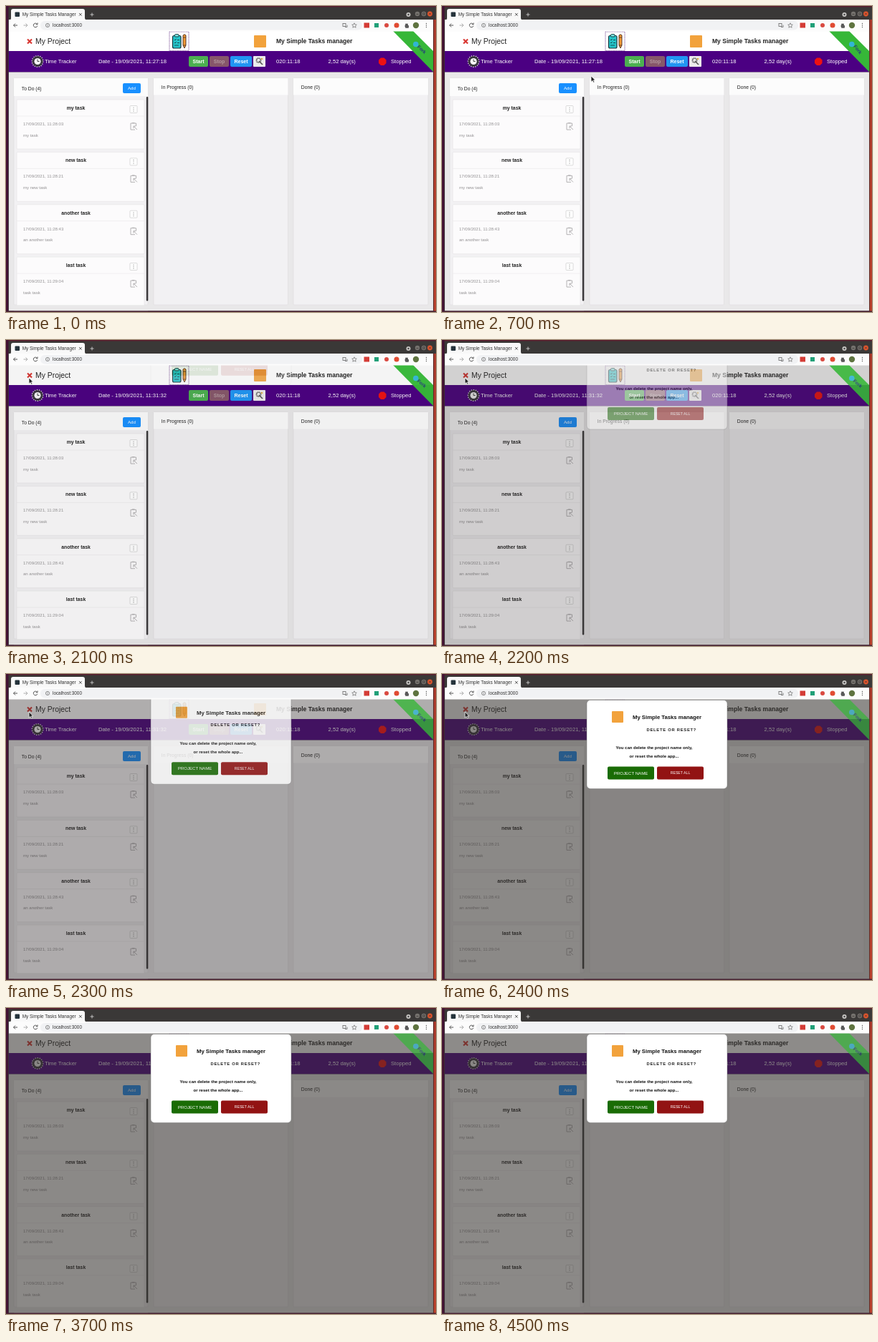
Write an HTML page that moves like this. It is 600 px wide and 428 px high and loops after 4700 ms.

```html
<!DOCTYPE html>
<html lang="en">
<head>
<meta charset="utf-8">
<title>Tasks</title>
<style>
html, body { margin: 0; width: 100%; height: 100%; overflow: hidden; background: #2b2029; }
svg { display: block; width: 100vw; height: 100vh; }
text { font-family: "Liberation Sans", Arial, sans-serif; white-space: pre; }
</style>
</head>
<body>
<svg id="stage" viewBox="0 0 600 428" preserveAspectRatio="none"></svg>
<script>
const LOOP = 4700, STEP = 100;

const text = (x, y, s, size, fill = '#222', more = '') =>
  `<text x="${x}" y="${y}" font-size="${size}" fill="${fill}" ${more}>${s}</text>`;
const rect = (x, y, w, h, fill, r = 0, more = '') =>
  `<rect x="${x}" y="${y}" width="${w}" height="${h}" fill="${fill}" rx="${r}" ${more}/>`;
const circle = (x, y, r, fill, more = '') =>
  `<circle cx="${x}" cy="${y}" r="${r}" fill="${fill}" ${more}/>`;
const line = (d, color, w = 1, more = '') =>
  `<path d="${d}" fill="none" stroke="${color}" stroke-width="${w}" ${more}/>`;
const BOLD = 'font-weight="bold"', MID = 'text-anchor="middle"', BM = BOLD + ' ' + MID;

const button = (x, y, w, h, fill, label, size, color = '#fff', more = MID) =>
  rect(x, y, w, h, fill, 2) + text(x + w / 2, y + h / 2 + size * .36, label, size, color, more);

function card(y, title, time, body) {
  const dots = [-2.4, 0, 2.4].map(d => circle(178, y + 13.5 + d, .6, '#888')).join('');
  return rect(15, y, 178, 69, '#fcfbfc', 1, 'stroke="#e4e2e4" stroke-width=".6"') +
    line(`M15 ${y + 23}H193`, '#ebe9eb', .7) +
    text(97.5, y + 14, title, 6.85, '#222', BM) +
    rect(173, y + 8.5, 10, 10, '#fff', 1, 'stroke="#ccc" stroke-width=".7"') + dots +
    text(24, y + 36, time, 6, '#929092') + text(24, y + 51.5, body, 6, '#929092') +
    line(`M180 ${y + 42}H174V${y + 33}H181.500V${y + 37}M176 ${y + 32.500}H179.500M178 ${y + 37}L183 ${y + 42}M178 ${y + 40}V${y + 37}H181`, '#b3b1b3', 1);
}

const column = (x, w, title, head) =>
  rect(x, 101, w, 317, '#f2f1f3', 1, 'stroke="#dddbdd" stroke-width=".6"') +
  rect(x, 101, w, head, '#fcfcfc') + text(x + 10.8, head > 24 ? 117.5 : 116, title, 6.75);

const clipboard =
  rect(228, 36, 27, 26.5, '#fff', 0, 'stroke="#70408f" stroke-width=".8" stroke-dasharray="1.5 .8"') +
  rect(232.500, 41.500, 11.5, 17.5, '#25c4c9', 2, 'stroke="#17343c" stroke-width="1.2"') +
  rect(235.500, 39.500, 5.500, 3.500, '#7be3df', 1, 'stroke="#17343c" stroke-width=".9"') +
  line('M235 47l1 1 1.500-2M239 47.500h3M235 51l1 1 1.500-2M239 51.500h3M235 55h6', '#14424b', .9) +
  `<path d="M247 41q2-2.500 4 0V55l-2 4-2-4Z" fill="#f39a35" stroke="#4a2b21" stroke-width=".9"/>` +
  line('M247 44h4M247 55h4', '#4a2b21', .8);

const header =
  rect(3, 35, 593, 28, '#fff') +
  line('M30 46.500l6 6m0-6l-6 6', '#d8342f', 2.1) +
  text(41, 52.8, 'My Project', 10.4) + clipboard +
  rect(346, 41, 17, 17, '#f2a23c', 1) +
  text(377, 52.3, 'My Simple Tasks manager', 8.56, '#222', BOLD);

const gear = circle(352.500, 76, 3, 'none', 'stroke="#555" stroke-width="1.7" stroke-dasharray="1.400 .6"') +
  line('M353 77l5 5', '#555', 1.6) + circle(357, 74, 1.3, '#e0b04b');

const tracker =
  rect(3, 63, 593, 29.500, '#4b0082') +
  circle(44, 77.500, 7.8, '#38343d', 'id="ring" stroke="#e8e2ec" stroke-width="1.3" stroke-dasharray="1.300 1.760"') +
  circle(44, 77.500, 4.6, '#f7f7f7') + line('M44 74.500v3h2.500', '#333', .9) +
  text(54, 80.2, 'Time Tracker', 7.68, '#fff') +
  text(129, 80.2, '', 7.68, '#fff', 'id="date"') +
  button(255, 70, 27, 15, '#4caf50', 'Start', 7, '#fff', BM) +
  button(284, 70, 27, 15, '#87576a', 'Stop', 7, '#b39a9f', BM) +
  button(313, 70, 30, 15, '#2196f3', 'Reset', 7, '#fff', BM) +
  rect(345, 70, 17, 15, '#ececec', 1) + gear +
  text(377, 80.2, '020:11:18', 7.68, '#fff') +
  text(449.500, 80.2, '2,52 day(s)', 7.68, '#fff') +
  `<path d="M523 72.500h4.500l3 3v4.500l-3 3H523l-3-3v-4.500Z" fill="#ee1111"/>` +
  text(537, 80.2, 'Stopped', 7.68, '#fff');

const tasks = [
  ['my task', '03', 'my task'], ['new task', '21', 'my new task'],
  ['another task', '43', 'an another task'], ['last task', '04', 'task task']
];
const board =
  rect(3, 92.500, 593, 334, '#e9e8e9') +
  column(11, 187, 'To Do (4)', 25) + column(206, 187.500, 'In Progress (0)', 23.500) +
  column(401, 188, 'Done (0)', 23.500) +
  button(163, 108, 25, 14, '#1890ff', 'Add', 6.2) +
  tasks.map(([title, sec, body], i) =>
    card(131 + i * 73.35, title, `17/09/2021, 11:${i < 3 ? 28 : 29}:${sec}`, body)).join('') +
  rect(11, 418.3, 187, 8, '#e9e8e9') +
  rect(195.800, 127, 2.500, 285.500, '#3a383a', 1);

const ribbon = `<g id="ribbon"><path d="M540 35H568L596 63V92Z" fill="#36b738"/>` +
  circle(571.800, 53.500, 3.8, '#31b5d6') +
  `<g id="tag">${text(0, 2, 'Fork', 6.5, '#25387f', BM)}</g></g>`;

const modal = `<g id="modal">` +
  rect(202, 36.500, 196, 124, '#fff', 5, 'stroke="#777" stroke-width=".5"') +
  rect(237, 52, 16, 16, '#f2a23c', 1) +
  text(266, 63, 'My Simple Tasks manager', 7.72, '#111', BOLD) +
  text(285.500, 79.700, 'DELETE OR RESET?', 5.8, '#222', BOLD + ' letter-spacing=".75"') +
  text(296, 105.2, 'You can delete the project name only,', 6.02, '#111', BM) +
  text(296, 117.2, 'or reset the whole app...', 6.02, '#111', BM) +
  button(231, 129.500, 65, 18, '#1a6c05', 'PROJECT NAME', 6.1) +
  button(300, 129.500, 65, 18, '#921313', 'RESET ALL', 5.2) + `</g>`;

const chrome =
  rect(0, 0, 600, 35, '#3a3837') + rect(0, 0, 600, 1.5, '#5a1c2c') +
  `<path d="M5 19.500q2 0 2-3V7q0-3 3-3H107q3 0 3 3v9.500q0 3 3 3Z" fill="#f8f8f8"/>` +
  rect(12.500, 8.500, 6.500, 6.500, '#25333b', 1) +
  text(22.800, 14.2, 'My Simple Tasks Manager', 6.4, '#333') +
  line('M102 10l3.600 3.600m0-3.600l-3.600 3.600', '#444', .9) +
  line('M117.500 12h5M120 9.500v5', '#ccc', .9) +
  circle(561.500, 12, 3, '#c9c7c5') + circle(561.500, 12, 1.2, '#444') +
  [574, 583].map(x => circle(x, 11, 3.2, '#75726e')).join('') + circle(591.500, 11, 3.4, '#e3562d') +
  line('M572.500 11.500h3M581.700 9.700h2.600v2.600h-2.600ZM590 9.500l3 3m0-3l-3 3', '#35322f', .7) +
  rect(3, 19, 593, 16.500, '#fcfcfc') + rect(48, 21, 449, 12.500, '#f1f2f4', 6) +
  line('M16 27H10.500m2.500-2.500L10.500 27l2.500 2.500', '#555', 1) +
  line('M24.500 27H30m-2.500-2.500L30 27l-2.500 2.500', '#aaa', 1) +
  line('M43.500 25.500a2.800 2.800 0 1 0 .3 2.300M44 23.500v2.300h-2.300', '#555', 1) +
  circle(58, 27, 2.6, 'none', 'stroke="#666" stroke-width=".7"') + line('M58 26.500v2M58 25v.7', '#666', .7) +
  text(65, 29.2, 'localhost:3000', 6.35, '#333') +
  rect(470, 24.500, 4, 4, 'none', 0, 'stroke="#666" stroke-width=".8"') + line('M473 29.500h3v-3', '#666', .8) +
  `<path d="M486 23.800l1 2.200 2.300.2-1.700 1.600.5 2.400-2.100-1.300-2.100 1.300.5-2.400-1.700-1.600 2.300-.2Z" fill="none" stroke="#666" stroke-width=".7"/>` +
  rect(499.500, 23.500, 7.500, 7, '#d43c36') + rect(514, 24, 6, 6, '#20a078') +
  circle(531, 27, 3, '#d94a41') + circle(545, 27, 3.5, '#e04b32') +
  line('M556.500 28h1.500v-2.500h2v2.500h2M558 30v-2h3v2Z', '#444', 1.5) +
  circle(572, 27, 4.2, '#5f7440') +
  [24.5, 27, 29.5].map(y => circle(586.500, y, .7, '#555')).join('');

const frame =
  `<linearGradient id="side" x2="0" y2="1"><stop stop-color="#a93a2b"/><stop offset="1" stop-color="#b8412c"/></linearGradient>` +
  rect(0, 0, 3.5, 428, '#431232') + rect(3, 19, .8, 408, '#39363a') +
  rect(596, 19, 4, 409, 'url(#side)') + rect(596, 19, .8, 408, '#4a2d2d') + rect(0, 426.500, 600, 1.5, '#4b2433');

const tooltip = `<g id="tip">` + rect(21, 60, 97, 13, '#3d3344', 3, 'opacity=".93"') +
  text(69.500, 68.8, 'Delete project name or reset all', 6.3, '#cbc5d0', MID) + `</g>`;

const cursors =
  `<path id="arrow" d="M0 0V8.200L2 6.400 3.500 9.200 4.800 8.500 3.400 5.800H6Z" fill="#222" stroke="#fff" stroke-width=".7"/>` +
  `<path id="hand" d="M-1 0q1-1.200 2 0V3l3.500 1q1 .5.7 2L4.300 9H0L-3 5.500q0-1.500 2-.3Z" fill="#fff" stroke="#222" stroke-width=".9"/>`;

document.getElementById('stage').innerHTML =
  header + tracker + board + tooltip + rect(3, 35, 593, 391.5, '#34302e', 0, 'id="shade"') +
  ribbon + modal + chrome + frame + cursors;

const $ = id => document.getElementById(id);
const clamp = x => Math.max(0, Math.min(1, x));
const set = (id, attr, value) => $(id).setAttribute(attr, value);
const show = (id, on) => set(id, 'visibility', on ? 'visible' : 'hidden');

// Pointer stops: time, x, y
const path = [[300, 560, 200], [900, 32, 47], [1800, 32, 47], [1900, 32, 53],
  [2600, 32, 53], [2900, 235.5, 100], [3200, 296, 137], [3600, 606, 12]];

function pointer(t) {
  const i = path.findIndex(p => p[0] > t);
  if (i < 1) return null;
  const [a, b] = [path[i - 1], path[i]];
  const k = (t - a[0]) / (b[0] - a[0]);
  return [a[1] + (b[1] - a[1]) * k, a[2] + (b[2] - a[2]) * k];
}

function draw(now) {
  const t = Math.floor(now % LOOP / STEP) * STEP;
  const k = t < 2100 ? 0 : clamp((t - 2070) / 330);
  const p = pointer(t), hover = t >= 900 && t < 1800;

  $('date').textContent = `Date - 19/09/2021, ${t < 1800 ? '11:27:18' : '11:31:32'}`;
  set('ring', 'transform', `rotate(${t * .06} 44 77.5)`);
  set('tag', 'transform', `translate(580 61) rotate(${45 + 6 * Math.sin(t / 400)})`);
  show('tip', t >= 1000 && t < 1800);
  set('shade', 'opacity', .56 * k);
  set('ribbon', 'opacity', 1 - .3 * k);
  set('modal', 'opacity', Math.min(1, 1.18 * k));
  set('modal', 'transform', `translate(0 ${-124 * (1 - k) ** 2.5})`);
  show('modal', k > 0);
  show('hand', p && hover);
  show('arrow', p && !hover);
  if (p) set(hover ? 'hand' : 'arrow', 'transform', `translate(${p})`);
}

const start = performance.now();
(function tick() {
  draw(performance.now() - start);
  requestAnimationFrame(tick);
})();
</script>
</body>
</html>
```
